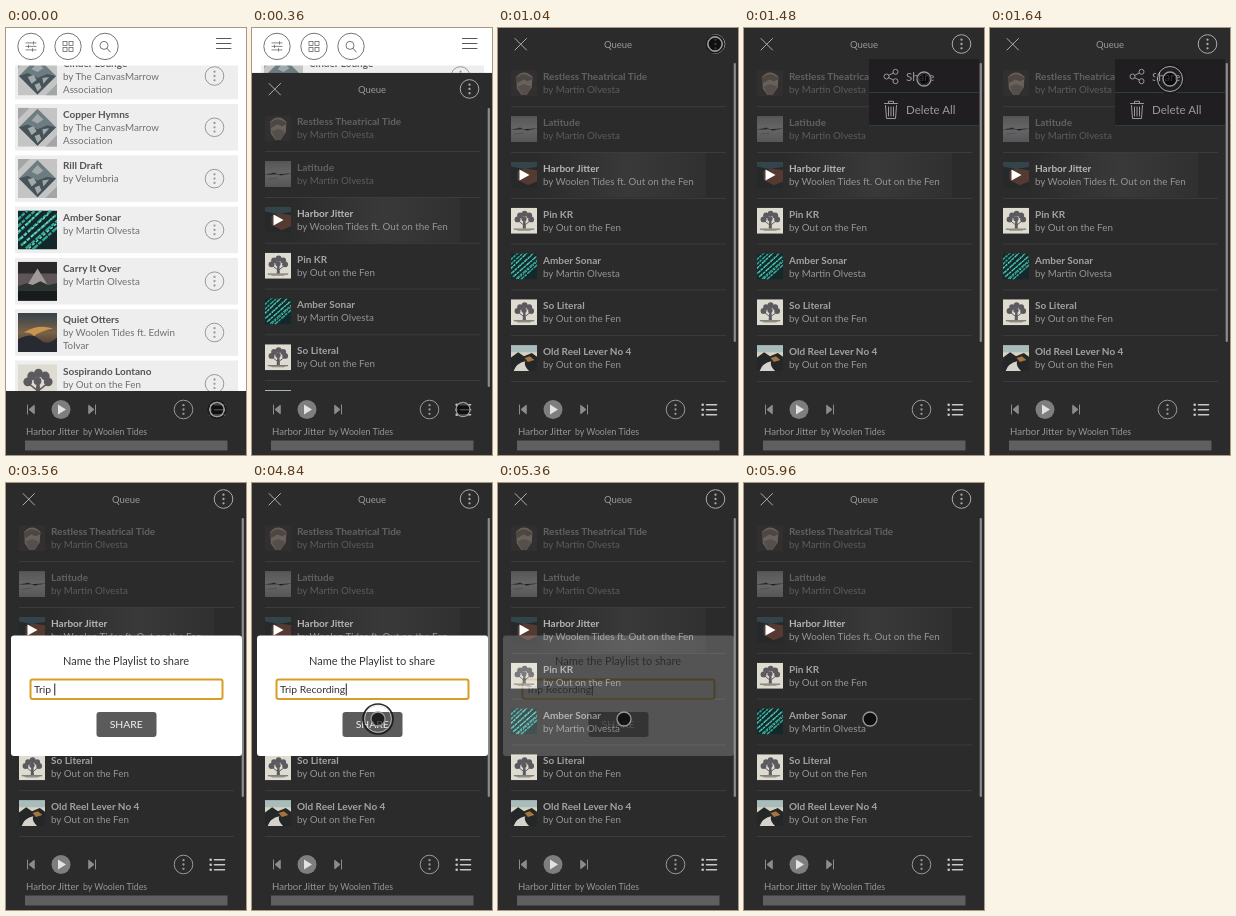
An HTML page that plays this animation: 240x427 px, repeating every 6 s.

```html
<!DOCTYPE html>
<html lang="en">
<head>
<meta charset="utf-8">
<title>Share a queue</title>
<style>
  html, body { margin: 0; width: 100%; height: 100%; overflow: hidden; background: #fff; }
  svg { display: block; width: 100vw; height: 100vh; }
  text { font-family: Lato, "Open Sans", sans-serif; font-size: 9.8px; white-space: pre; }
  .title { font-size: 10px; font-weight: 700; }
  .mid { text-anchor: middle; }
  .line { fill: none; stroke-linecap: round; stroke-linejoin: round; }
</style>
</head>
<body>
<svg id="stage" viewBox="0 0 240 427">
  <defs>
    <linearGradient id="glow">
      <stop offset="0" stop-color="#2b2b2b"/><stop offset=".55" stop-color="#393939"/><stop offset="1" stop-color="#303030"/>
    </linearGradient>
    <linearGradient id="dusk" x2="0" y2="1">
      <stop offset="0" stop-color="#34424c"/><stop offset=".5" stop-color="#7a6248"/><stop offset="1" stop-color="#2b2a2c"/>
    </linearGradient>
    <linearGradient id="fog" x2="0" y2="1">
      <stop offset="0" stop-color="#8c8c90"/><stop offset=".5" stop-color="#aeaeb0"/><stop offset="1" stop-color="#8b8b8f"/>
    </linearGradient>
    <symbol id="diamond" viewBox="0 0 40 40">
      <path fill="#c3c4c3" d="M0 0h40v40H0z"/>
      <path fill="#a3a6a6" d="M0 0h12L0 12zM40 40H28l12-12z"/>
      <path fill="#6d7c80" d="M20 1 39 20 20 39 1 20z"/>
      <path fill="#46545a" d="M1 20l9-3 10 5 10-4 9 2L20 39z"/>
      <path fill="#a0aaab" d="M20 6l6 6-6 4-6-3zM10 21l6-2 3 5-5 4zM25 22l7-1-6 7zM17 29l5-2 2 5-4 4z"/>
    </symbol>
    <symbol id="stripes" viewBox="0 0 40 40">
      <path fill="#14282a" d="M0 0h40v40H0z"/>
      <g stroke="#2fa898" stroke-width="2.4" stroke-dasharray="7 1 4 1.5">
        <path d="M-2 11 13-3M-2 18 21-3M-2 25 29-5M0 31 34 0M3 36 40 4M8 39 42 9M15 40 42 16"/>
      </g>
      <path stroke="#7fd8ca" stroke-width="1.4" stroke-dasharray="3 2" d="M0 22 25-1M3 29 31 4M6 34 37 6M11 39 40 13"/>
    </symbol>
    <symbol id="peak" viewBox="0 0 40 40">
      <path fill="#2a2829" d="M0 0h40v40H0z"/>
      <path fill="#5d5557" d="M0 12h40v13H0z"/>
      <path fill="#a09a99" d="M20 7 31 25H9z"/>
      <path fill="#2c3330" d="M0 25l9-3 6 2 8-4 8 4 9-2v18H0z"/>
      <path fill="#171b1b" d="M0 30h40v10H0z"/>
    </symbol>
    <symbol id="dune" viewBox="0 0 40 40">
      <path fill="url(#dusk)" d="M0 0h40v40H0z"/>
      <path fill="#c8944f" d="M6 20q14-9 30-4-14 3-20 8-1-4-10-4z"/>
      <path fill="#272a31" d="M0 27q14-8 22 0t18-2v15H0z"/>
    </symbol>
    <symbol id="tree" viewBox="0 0 40 40">
      <path fill="#dedbd0" d="M0 0h40v40H0z"/>
      <g fill="#5c5a5e">
        <circle cx="10" cy="18" r="4.5"/><circle cx="14" cy="12" r="4.5"/><circle cx="21" cy="9" r="4.5"/>
        <circle cx="28" cy="12" r="4.5"/><circle cx="31" cy="18" r="4.5"/><circle cx="20" cy="17" r="4"/>
        <path d="M19 17h3l1 15h-5z"/>
      </g>
      <path class="line" stroke="#5c5a5e" stroke-width="1.5" d="M10 19l10 8M31 19l-10 8M5 33h30"/>
      <path fill="#918d83" d="M6 33h28l-5 2.500H11z"/>
    </symbol>
    <symbol id="shade" viewBox="0 0 40 40">
      <path fill="#3a3634" d="M0 0h40v40H0z"/>
      <path fill="#b3a094" d="M8 10q12-13 25 0l-1 16-8 12h-8L9 28z"/>
      <path fill="#7a675d" d="M7 13q12-14 27 0l-8 4-7-3-10 6z"/>
      <path fill="#8a7a71" d="M10 25l10-4 11 4-7 13h-7z"/>
    </symbol>
    <symbol id="mist" viewBox="0 0 40 40">
      <path fill="url(#fog)" d="M0 0h40v40H0z"/>
      <path stroke="#68686d" d="M0 21l14-3 10 4 16-3M5 28l14-2"/>
    </symbol>
    <symbol id="ember" viewBox="0 0 40 40">
      <path fill="#26292a" d="M0 0h40v40H0z"/>
      <path fill="#553a31" d="M10 14l12-4 18 3v17l-14 6-16-8z"/>
      <path fill="#33444a" d="M0 0h40v8L19 11 0 7z"/>
    </symbol>
    <symbol id="coast" viewBox="0 0 40 40">
      <path fill="#a9bcbc" d="M0 0h40v40H0z"/>
      <path fill="#d8d2c0" d="M0 11h40v9H0z"/>
      <path fill="#242728" d="M0 19l11-8 9 6 12-5 8 6v22H0z"/>
      <path fill="#a5753f" d="M21 20l8-3 7 6-10 3z"/>
      <path fill="#d5d3cb" d="M4 40q4-12 18-15-3 6 6 15z"/>
    </symbol>
  </defs>
  <g id="library"></g>
  <g id="queue"></g>
  <g id="player"></g>
  <g id="menu"></g>
  <g id="dialog"></g>
  <g id="pointer">
    <circle id="ripple" fill="none" stroke="#1a1a1a" stroke-width="1.6"/>
    <circle id="rippleIn" fill="none" stroke="#ddd" stroke-width=".9"/>
    <circle r="7" fill="#000" fill-opacity=".65" stroke="#999" stroke-width="1.3"/>
  </g>
</svg>
<script>
const $ = id => document.getElementById(id);
const LOOP = 6000;

const text = (x, y, s, fill, cls = '', size = '') =>
  `<text x="${x}" y="${y}" fill="${fill}" class="${cls}"${size && ` style="font-size:${size}px"`}>${s}</text>`;
const rect = (x, y, w, h, fill, extra = '') =>
  `<rect x="${x}" y="${y}" width="${w}" height="${h}" fill="${fill}" ${extra}/>`;
const line = (d, stroke, width = 1, fill = 'none') =>
  `<path class="line" d="${d}" stroke="${stroke}" stroke-width="${width}" style="fill:${fill}"/>`;
const ring = (x, y, r, stroke, width = 1) =>
  `<circle cx="${x}" cy="${y}" r="${r}" fill="none" stroke="${stroke}" stroke-width="${width}"/>`;
const dot = (x, y, r, fill) => `<circle cx="${x}" cy="${y}" r="${r}" fill="${fill}"/>`;
const cover = (id, x, y, size) => `<use href="#${id}" x="${x}" y="${y}" width="${size}" height="${size}"/>`;
const moreButton = (x, y, color) =>
  ring(x, y, 9.3, color) + [-4.3, 0, 4.3].map(d => dot(x, y + d, 1.15, color)).join('');

const band = 'Woolen Tides', trio = 'Out on the Fen', solo = 'Martin Olvesta', song = 'Harbor Jitter';
const firm = ['by The CanvasMarrow', 'Association'];

const tracks = [
  ['diamond', 'Cinder Lounge', ...firm],
  ['diamond', 'Copper Hymns', ...firm],
  ['diamond', 'Rill Draft', 'by Velumbria'],
  ['stripes', 'Amber Sonar', 'by ' + solo],
  ['peak', 'Carry It Over', 'by ' + solo],
  ['dune', 'Quiet Otters', `by ${band} ft. Edwin`, 'Tolvar'],
  ['tree', 'Sospirando Lontano', 'by ' + trio]
];

const queued = [
  ['shade', 'Restless Theatrical Tide', solo],
  ['mist', 'Latitude', solo],
  ['ember', song, `${band} ft. ${trio}`],
  ['tree', 'Pin KR', trio],
  ['stripes', 'Amber Sonar', solo],
  ['tree', 'So Literal', trio],
  ['coast', 'Old Reel Lever No 4', trio]
];

$('library').innerHTML = rect(0, 0, 240, 427, '#fff') +
  tracks.map(([art, title, ...by], i) => {
    const y = 24.7 + 51.3 * i;
    return rect(9, y, 223, 46.6, '#eee') + cover(art, 12, y + 3.8, 39) +
      text(57, y + 14, title, '#555', 'title') +
      by.map((s, n) => text(57, y + 27 + 13 * n, s, '#707070')).join('') +
      moreButton(208.5, y + 23.3, '#999');
  }).join('') +
  rect(0, 0, 240, 37.5, '#fff') +
  '<g transform="translate(-.5 .4)">' +
  [25.5, 62.5, 99.5].map(x => ring(x, 18, 13.2, '#666', .9)).join('') +
  line('M20.5 14.500h10M20.5 18h10M20.5 21.5h10M28 13.2v2.600M23 16.7v2.600M27 20.2v2.600', '#666', .8) +
  [57.5, 63.5].map(x => [13, 19].map(y => rect(x, y, 4, 4, 'none', 'stroke="#666" stroke-width=".8"')).join('')).join('') +
  ring(98.5, 17, 4, '#666', .9) + line('M101.5 20l3.2 3.5', '#666') + '</g>' +
  line('M210.5 10.5h14.5M210.5 15.5h14.5M210.5 20.5h14.5', '#444', .9);

$('queue').innerHTML = rect(0, 0, 240, 364, '#2b2b2b') +
  line('M17 10.5l11.5 11.5M28.5 10.5l-11.5 11.5', '#bbb', .9) +
  text(120, 20, 'Queue', '#999', 'mid', 9.5) + moreButton(217.5, 16, '#aaa') +
  rect(38, 125, 170, 44.5, 'url(#glow)') +
  queued.map(([art, title, by], i) => {
    const y = 42.3 + 45.8 * i;
    return `<g opacity="${i < 2 ? .45 : 1}">${cover(art, 13, y, 26)}` +
      text(45, y + 10, title, i === 2 ? '#b5b5b5' : '#a2a2a2', 'title') +
      text(45, y + 23, 'by ' + by, '#959595') + '</g>' +
      rect(13, y + 36, 215, .8, '#404040');
  }).join('') +
  '<path d="M21.5 141.5l10 5.5-10 5.5z" fill="#fff"/>' +
  rect(235.7, 35, 2.2, 279, '#8c8c8c', 'rx="1"');

$('player').innerHTML = rect(0, 363, 240, 64, '#2b2b2b') +
  line('M21.5 377v9M28 377.5l-5 4 5 4zM89.5 377v9M83 377.5l5 4-5 4z', '#8c8c8c', 1, '#8c8c8c') +
  dot(55, 381.5, 9.5, '#7e7e7e') + '<path d="M52 376.5l8 5-8 5z" fill="#e2e2e2"/>' +
  moreButton(177.5, 381.5, '#999') +
  [376.7, 381.7, 386.7].map(y => dot(204.7, y, 1.3, '#c8c8c8') + line(`M208.5 ${y}h10`, '#c8c8c8', 1.6)).join('') +
  text(20, 407, song, '#959595', '', 9.6) + text(77, 407, 'by ' + band, '#959595', '', 8.8) +
  rect(19, 412.5, 202.5, 10, '#5f5f5f');

$('menu').innerHTML = rect(125, 31, 110, 67, '#211e21') +
  rect(125, 64, 110, 1, '#2c403f') + rect(125, 97, 110, 1, '#2c403f') +
  ring(142.5, 48.5, 2.5, '#9a9a9a') + ring(151.5, 43.8, 2.5, '#9a9a9a') + ring(151.5, 53.2, 2.5, '#9a9a9a') +
  line('M144.8 47.3l4.4-2.3M144.8 49.7l4.4 2.3', '#9a9a9a') +
  line('M140.5 75.5h13M144.5 75.5v-2.2h5v2.2M141.5 77.5l1 13h9l1-13M144.5 79v9M147 79v9M149.5 79v9', '#9a9a9a') +
  text(162, 52.7, 'Share', '#9a9a9a', '', 11.5) + text(162, 85.5, 'Delete All', '#9a9a9a', '', 11.5);

$('dialog').innerHTML = rect(5, 152.5, 231, 120.5, '#fff', 'rx="3"') +
  text(120, 181.5, 'Name the Playlist to share', '#333', 'mid', 11) +
  rect(24.5, 196.5, 192, 19.5, '#fff', 'rx="2" stroke="#d99d25" stroke-width="2"') +
  '<text id="field" x="28" y="210" fill="#333" style="font-size:10.4px"></text>' +
  '<rect id="caret" y="200.5" width="1" height="12" fill="#222"/>' +
  rect(90.5, 229, 60, 25, '#5b5b5b', 'rx="3"') +
  text(120.3, 245.3, 'SHARE', '#f2f2f2', 'mid', 10.4);

// Eased progress from time a to time b.
const ramp = (t, a, b) => {
  const k = Math.min(1, Math.max(0, (t - a) / (b - a)));
  return k * k * (3 - 2 * k);
};
const mix = (a, b, k) => a + (b - a) * k;
const fade = (id, value) => {
  $(id).style.opacity = value;
  $(id).style.display = value > 0 ? '' : 'none';
};

const oldName = 'My Queue', newName = 'Trip Recording';
const keyTimes = [3160, 3280, 3360, 3440, 3560, 3680, 3760, 3880, 3960, 4040, 4120, 4200, 4280, 4360];

function typed(t) {
  if (t < 2200) return oldName;
  if (t < 2480) return oldName.slice(0, -1);
  if (t < 2760) return oldName.slice(0, 6 - Math.floor((t - 2480) / 40));
  return newName.slice(0, keyTimes.filter(k => k <= t).length);
}

const stops = [[0, 211, 381.5], [680, 211, 381.5], [1000, 217, 16], [1200, 217, 16], [1440, 180, 51], [4400, 180, 51], [4401, 126, 236]];
const taps = [-40, 1000, 1480, 4660];

function pointerAt(t) {
  const n = stops.findLastIndex(s => s[0] <= t);
  const [t0, x0, y0] = stops[n], [t1, x1, y1] = stops[n + 1] || [LOOP, x0, y0];
  const k = ramp(t, t0, t1);
  return [mix(x0, x1, k), mix(y0, y1, k)];
}

function draw(now) {
  const t = now % LOOP;

  const rise = 1 - (1 - Math.min(1, Math.max(0, (t - 120) / 480))) ** 3;
  $('queue').setAttribute('transform', `translate(0 ${mix(364, 0, rise)})`);
  fade('menu', ramp(t, 1140, 1280) - ramp(t, 1960, 2160));
  fade('dialog', ramp(t, 1660, 1920) - ramp(t, 5160, 5440));

  const field = $('field');
  field.textContent = typed(t);
  $('caret').setAttribute('x', 28.5 + (field.textContent ? field.getComputedTextLength() : 0));

  const [x, y] = pointerAt(t);
  $('pointer').setAttribute('transform', `translate(${x} ${y})`);
  fade('pointer', 1 - ramp(t, 1640, 1840) + ramp(t, 4500, 4640));

  const age = (t - taps.findLast(s => s <= t)) / 340;
  const r = 7 + 15 * Math.min(1, age);
  $('ripple').setAttribute('r', r);
  $('rippleIn').setAttribute('r', r - 1.6);
  const glow = Math.max(0, Math.min(1, 2 * (1 - age)));
  fade('ripple', glow);
  fade('rippleIn', glow * .8);

  requestAnimationFrame(draw);
}
requestAnimationFrame(draw);
</script>
</body>
</html>
```
